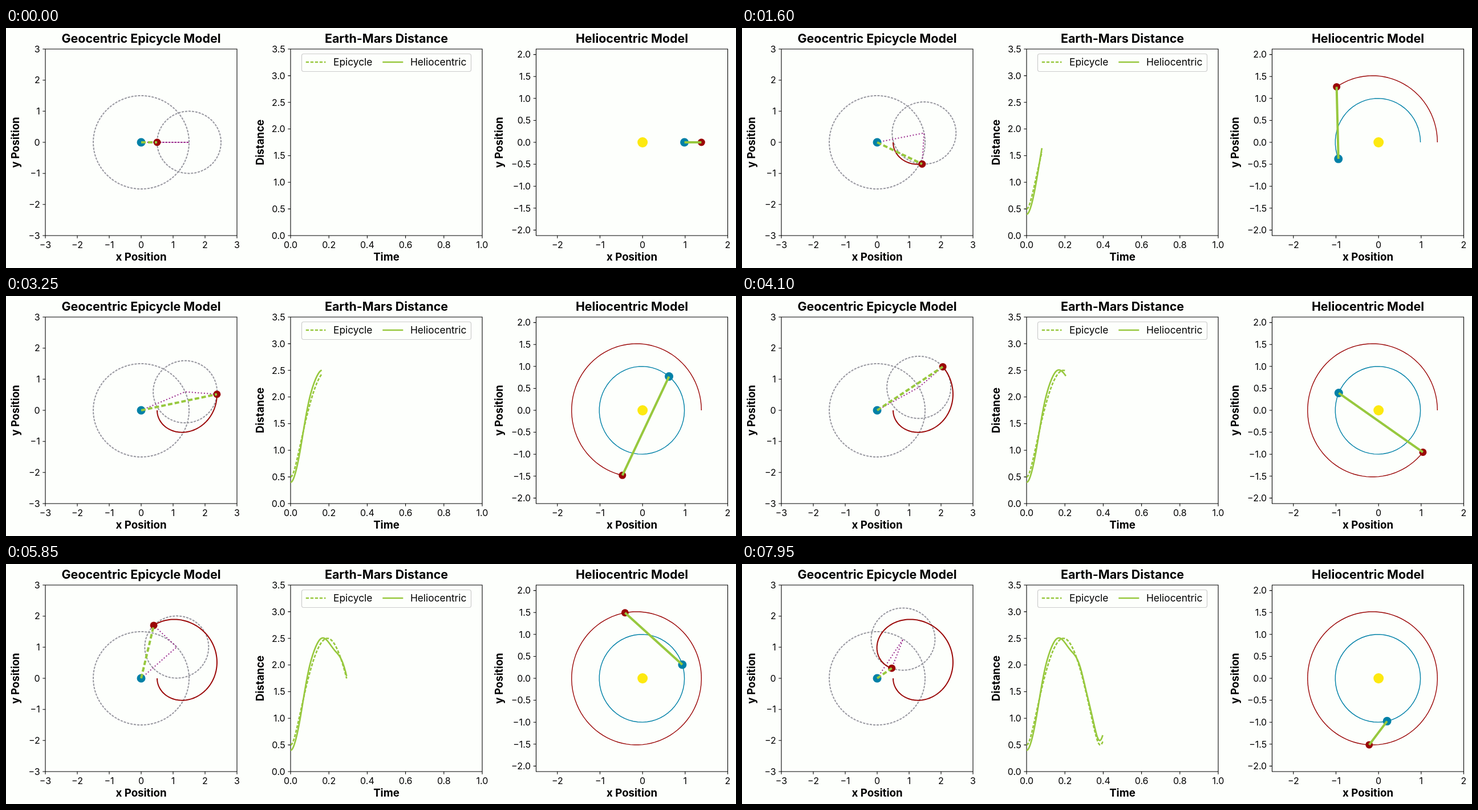
Animation, 1280 px wide and 422 px high, one loop 8000 ms. Source, as an HTML page:

```html
<!DOCTYPE html>
<html lang="en">
<head>
<meta charset="utf-8">
<title>Epicycle and heliocentric models</title>
<style>
  html, body { margin: 0; width: 100%; height: 100%; overflow: hidden; background: #fdfffc; }
  svg { display: block; font-family: Inter, "Open Sans", sans-serif; font-optical-sizing: none; }
  text { fill: #000; font-size: 16px; text-anchor: middle; }
  .title { font-size: 21.4px; font-weight: 700; }
  .label { font-size: 18.67px; font-weight: 700; }
  .legend { font-size: 17.33px; text-anchor: start; }
  .end { text-anchor: end; }
  path { fill: none; }
  .axis { stroke: #000; stroke-width: 1.07; }
  .ring { stroke: #97979f; stroke-width: 2; stroke-dasharray: 4 2; }
  .arms { stroke: #9b2c8e; stroke-width: 2; stroke-dasharray: 2 3.3; }
  .trail { stroke: #9a0707; stroke-width: 2; stroke-linejoin: round; }
  .orbit { stroke-width: 1.4; stroke-linejoin: round; }
  .green { stroke: #97c83e; stroke-width: 2.67; stroke-linejoin: round; }
  .dash { stroke-dasharray: 5.33 2.67; }
  .link { stroke-width: 4; }
  .link.dash { stroke-dasharray: 8 4; }
</style>
</head>
<body>
<svg id="stage" width="1280" height="422" viewBox="0 0 1280 422"></svg>
<script>
const STEP = 50, FRAMES = 160, SAMPLES = 400;
const TOP = 37, BOTTOM = 365, WIDTH = 336;
const BLUE = '#0081a7', RED = '#9a0707', YELLOW = '#fde910';
const TAU = 2 * Math.PI;
const stage = document.getElementById('stage');

function add(tag, attrs, text) {
  const el = document.createElementNS('http://www.w3.org/2000/svg', tag);
  for (const k in attrs) el.setAttribute(k, attrs[k]);
  if (text) el.textContent = text;
  stage.appendChild(el);
  return el;
}
const path = (cls, d = '') => add('path', { class: cls, d });
const dot = (r, fill) => add('circle', { r, fill });
const label = (cls, x, y, text) => add('text', { class: cls, x, y }, text);
const range = (a, b, step) =>
  Array.from({ length: Math.round((b - a) / step) + 1 }, (_, i) => a + i * step);

// Axes with ticks and names; returns the map from data to pixels.
function axes({ left, xlim, ylim, xticks, yticks, digits, title, xname, yname, ynameX }) {
  const px = x => left + (x - xlim[0]) / (xlim[1] - xlim[0]) * WIDTH;
  const py = y => BOTTOM - (y - ylim[0]) / (ylim[1] - ylim[0]) * (BOTTOM - TOP);
  const mid = left + WIDTH / 2, cy = (TOP + BOTTOM) / 2;
  const fmt = (v, n) => v.toFixed(n).replace('-', '\u2212');
  let d = `M${left} ${TOP}h${WIDTH}V${BOTTOM}H${left}Z`;
  for (const v of xticks) {
    d += `M${px(v)} ${BOTTOM}v4.7`;
    label('', px(v), 387, fmt(v, digits[0]));
  }
  for (const v of yticks) {
    d += `M${left} ${py(v)}h-4.7`;
    label('end', left - 9.3, py(v) + 5.8, fmt(v, digits[1]));
  }
  path('axis', d);
  label('title', mid, 26.2, title);
  label('label', mid, 408.6, xname);
  add('text', { class: 'label', transform: `translate(${ynameX} ${cy}) rotate(-90)` }, yname);
  return ([x, y]) => [px(x), py(y)];
}

const geo = axes({
  left: 69, xlim: [-3, 3], ylim: [-3, 3], digits: [0, 0],
  xticks: range(-3, 3, 1), yticks: range(-3, 3, 1),
  title: 'Geocentric Epicycle Model', xname: 'x Position', yname: 'y Position', ynameX: 23.3
});
const dist = axes({
  left: 499, xlim: [0, 1], ylim: [0, 3.5], digits: [1, 1],
  xticks: range(0, 1, 0.2), yticks: range(0, 3.5, 0.5),
  title: 'Earth-Mars Distance', xname: 'Time', yname: 'Distance', ynameX: 451.7
});
const helio = axes({
  left: 929.5, xlim: [-2.5, 2], ylim: [-2.125, 2.125], digits: [0, 1],
  xticks: range(-2, 2, 1), yticks: range(-2, 2, 0.5),
  title: 'Heliocentric Model', xname: 'x Position', yname: 'y Position', ynameX: 870.5
});

const polar = (r, a) => [r * Math.cos(a), r * Math.sin(a)];
const plus = (p, q) => [p[0] + q[0], p[1] + q[1]];
const line = (pts, map) => 'M' + pts.map(p => map(p).map(v => v.toFixed(2)).join(' ')).join('L');
const ring = (c, r) => line(range(0, 120, 1).map(i => plus(c, polar(r, i * TAU / 120))), geo);

// Point on an ellipse with the sun in one focus.
function planet(a, e, turns, t) {
  const m = TAU * turns * t;
  const nu = m + e * Math.sin(m) * (1 + Math.cos(m));
  return polar(a * (1 - e * e) / (1 + e * Math.cos(nu)), nu);
}

const states = range(0, FRAMES - 1, 1).map(k => {
  const t = k / SAMPLES;
  const hub = polar(1.5, 0.4 * TAU * t);
  const body = plus(hub, polar(1, Math.PI + 3 * TAU * t));
  const earth = planet(1, 0.0167, 7.007, t);
  const mars = planet(1.524, 0.0934, 4.38, t);
  return {
    hub, body, earth, mars,
    near: [t, Math.hypot(...body)],
    far: [t, Math.hypot(mars[0] - earth[0], mars[1] - earth[1])]
  };
});

const origin = [0, 0];
path('ring', ring(origin, 1.5));
const epicycle = path('ring');
const arms = path('arms');
const bodyTrail = path('trail');
const center = dot(7.5, BLUE), body = dot(6.5, RED);
const geoLink = path('green link dash');

const nearCurve = path('green dash'), farCurve = path('green');
add('rect', { x: 518.5, y: 45.5, width: 297, height: 31, rx: 3.5, fill: '#fdfffc', stroke: '#ccc', 'stroke-width': 1.2 });
path('green dash', 'M525.8 60h34.7');
path('green', 'M660.3 60h36');
label('legend', 574, 66.4, 'Epicycle');
label('legend', 708.9, 66.4, 'Heliocentric');

const earthTrail = path('orbit'), marsTrail = path('orbit');
earthTrail.setAttribute('stroke', BLUE);
marsTrail.setAttribute('stroke', RED);
const sun = dot(9, YELLOW), earth = dot(7.5, BLUE), mars = dot(6.5, RED);
const helioLink = path('green link');

function place(el, [x, y]) {
  el.setAttribute('cx', x);
  el.setAttribute('cy', y);
}
const trace = (el, pts, map) => el.setAttribute('d', line(pts, map));
place(center, geo(origin));
place(sun, helio(origin));

function draw(k) {
  const s = states[k], past = states.slice(0, k + 1);
  const trail = (el, key, map) => trace(el, past.map(p => p[key]), map);
  epicycle.setAttribute('d', ring(s.hub, 1));
  trace(arms, [origin, s.hub, s.body], geo);
  trace(geoLink, [origin, s.body], geo);
  trace(helioLink, [s.earth, s.mars], helio);
  trail(bodyTrail, 'body', geo);
  trail(nearCurve, 'near', dist);
  trail(farCurve, 'far', dist);
  trail(earthTrail, 'earth', helio);
  trail(marsTrail, 'mars', helio);
  place(body, geo(s.body));
  place(earth, helio(s.earth));
  place(mars, helio(s.mars));
}

let shown = -1;
const start = performance.now();
function tick() {
  const k = Math.floor((performance.now() - start) / STEP) % FRAMES;
  if (k !== shown) draw(shown = k);
  requestAnimationFrame(tick);
}
tick();
</script>
</body>
</html>
```
